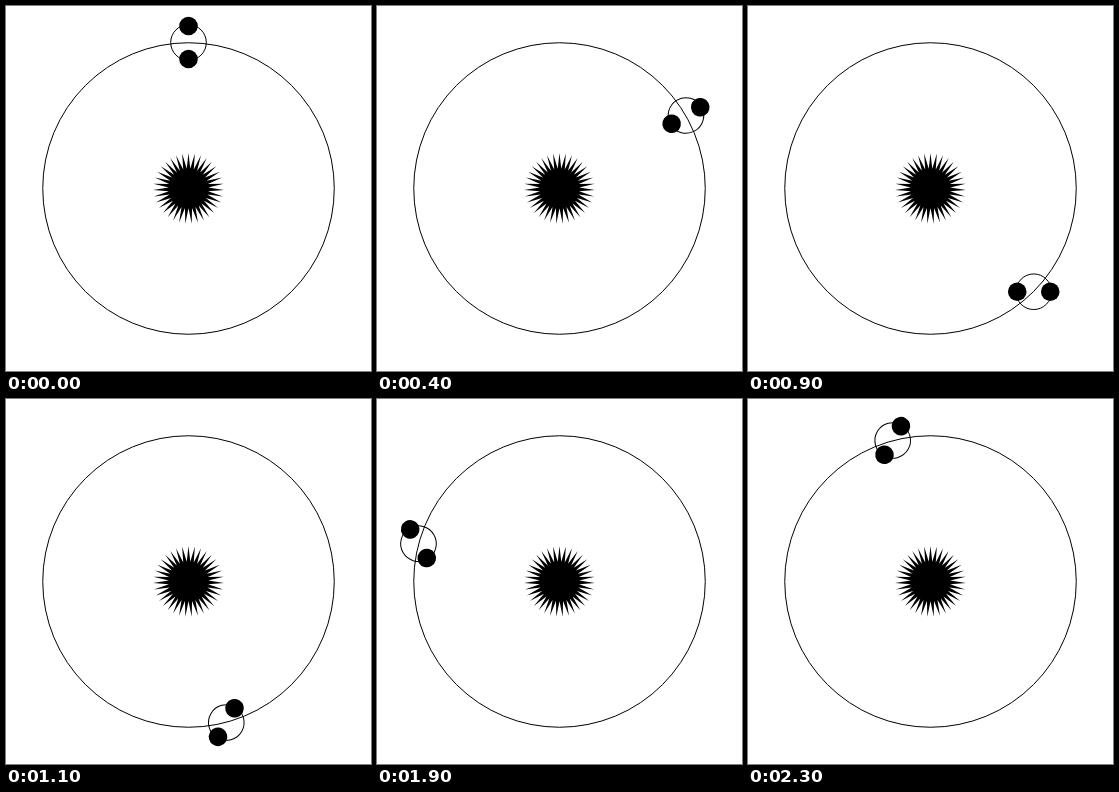
These frames come from a looping animation (365x365 px, 2400 ms). An HTML page:

```html
<!DOCTYPE html>
<html lang="en">
<head>
<meta charset="utf-8">
<title>Orbits</title>
<style>
  html, body { margin: 0; width: 100%; height: 100%; overflow: hidden; background: #fff; }
  svg { display: block; width: 100%; height: 100%; }
  .line { fill: none; stroke: #000; }
</style>
</head>
<body>
<svg viewBox="0 0 365 365">
  <g transform="translate(182.5 182.5)">
    <circle class="line" r="145.75"/>
    <polygon id="sun"/>
    <g id="pair">
      <circle class="line" r="17.8"/>
      <circle cy="-16.5" r="9.3"/>
      <circle cy="16.5" r="9.3"/>
    </g>
  </g>
</svg>
<script>
  const STEP = 100, STEPS = 24, ORBIT = 146, RAYS = 35;
  const sun = document.getElementById('sun');
  const pair = document.getElementById('pair');

  // Point at radius r, turned clockwise from the top by a fraction of a circle
  const polar = (r, turn) => {
    const a = turn * 2 * Math.PI;
    return [r * Math.sin(a), -r * Math.cos(a)];
  };

  sun.setAttribute('points', Array.from({ length: RAYS * 2 }, (_, i) =>
    polar(i % 2 ? 19.8 : 35.5, i / (RAYS * 2))).join(' '));

  // The pair circles the sun once per loop and spins twice the other way
  function draw(now) {
    const turn = Math.floor(now / STEP) % STEPS / STEPS;
    const [x, y] = polar(ORBIT, turn);
    pair.setAttribute('transform', `translate(${x} ${y}) rotate(${-720 * turn})`);
  }

  function tick() {
    draw(performance.now() - start);
    requestAnimationFrame(tick);
  }

  const start = performance.now();
  tick();
</script>
</body>
</html>
```
